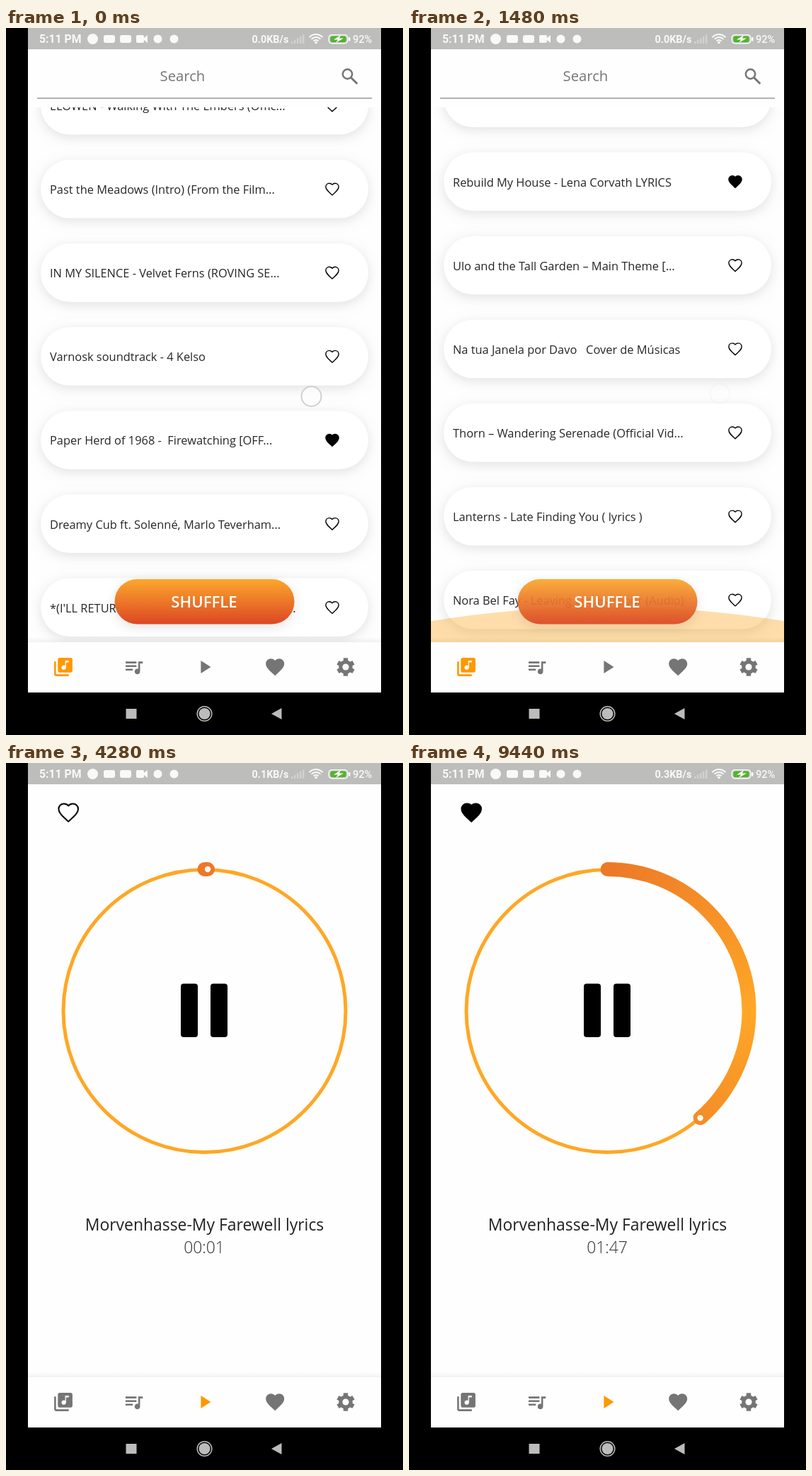
Write an HTML page with a canvas that moves like this. It is 561x998 px and loops after 9480 ms.

```html
<!DOCTYPE html>
<html lang="en">
<head>
<meta charset="utf-8">
<title>Music player</title>
<style>
  html, body { margin: 0; width: 100%; height: 100%; overflow: hidden; background: #000; }
  canvas { display: block; }
</style>
</head>
<body>
<canvas id="stage" width="561" height="998"></canvas>
<script>
const ctx = document.getElementById('stage').getContext('2d');
const LOOP = 9480, STEP = 40, PLAYER_AT = 4280, LIKE_AT = 8360;
const TAU = Math.PI * 2;
const PAPER = '#fdfefd', GREY = '#757575', ORANGE = '#ff9800', AMBER = '#ffa726', RUST = '#ec7828';
const TITLE = 'Morvenhasse-My Farewell lyrics';
const DURATION = 277;

const songs = [
  'ELOWEN - Walking With The Embers (Offic...',
  'Past the Meadows (Intro) (From the Film...',
  'IN MY SILENCE - Velvet Ferns (ROVING SE...',
  'Varnosk soundtrack - 4 Kelso',
  'Paper Herd of 1968 -  Firewatching [OFF...',
  'Dreamy Cub ft. Solenné, Marlo Teverham...',
  "*(I'LL RETURN TO THE OLD HARBOUR SHOR...",
  'Tessaly Grove - Paper Lanterns (Lyrics)',
  'Marrow Pine - Slow Tide [LIVE]',
  'u-ne - Walk To Me (Official 4K Music Vi...',
  'Dario Vance - Since I Left Your Town (Offic...',
  'Tale of the Marsh',
  'Ona - Raincoat',
  'Ona - Carry Us West',
  'Unlit Sky - Ironmoth [OFFICIAL VIDEO]',
  TITLE,
  'Ferrow - Quiet Engines (Visualizer)',
  'Lunet Vale - Copper Rain [LYRICS]',
  "Four Floors at Barley's 2 Song - The Li...",
  'Perry Calden - Edge of the Rain (Audio)',
  'Gather It or Run (Theme from "Farthest...',
  'Rebuild My House - Lena Corvath LYRICS',
  'Ulo and the Tall Garden – Main Theme [...',
  'Na tua Janela por Davo   Cover de Músicas',
  'Thorn – Wandering Serenade (Official Vid...',
  'Lanterns - Late Finding You ( lyrics )',
  'Nora Bel Fay - Leaving Old Harbour (Audio)'
];
const liked = new Set([4, 18, 21]);

const HEART = new Path2D('M16.5 3c-1.74 0-3.41.81-4.5 2.09C10.91 3.81 9.24 3 7.5 3 4.42 3 2 5.42 2 8.5c0 3.78 3.4 6.86 8.55 11.54L12 21.35l1.45-1.32C18.6 15.36 22 12.28 22 8.5 22 5.42 19.58 3 16.5 3z');
const LIBRARY = new Path2D('M20 2H8c-1.1 0-2 .9-2 2v12c0 1.1.9 2 2 2h12c1.1 0 2-.9 2-2V4c0-1.1-.9-2-2-2zm-2 5h-3v5.5c0 1.38-1.12 2.5-2.5 2.5S10 13.88 10 12.5s1.12-2.5 2.5-2.5c.57 0 1.08.19 1.5.51V5h4v2zM4 6H2v14c0 1.1.9 2 2 2h14v-2H4V6z');
const QUEUE = new Path2D('M15 6H3v2h12V6zm0 4H3v2h12v-2zM3 16h8v-2H3v2zM17 6v8.18c-.31-.11-.65-.18-1-.18-1.66 0-3 1.34-3 3s1.34 3 3 3 3-1.34 3-3V8h3V6h-5z');
const PLAY = new Path2D('M8 5v14l11-7z');

const clamp = v => Math.max(0, Math.min(1, v));
const progress = (t, from, to) => clamp((t - from) / (to - from));
const mix = (a, b, u) => a + (b - a) * u;
const easeOut = u => 1 - (1 - u) ** 2;
const smooth = u => u * u * (3 - 2 * u);

function scrollAt(t) {
  if (t < 1240) return 1424 * easeOut(progress(t, 280, 1240));
  if (t < 2200) return mix(1424, 2372.5, progress(t, 1240, 1460));
  if (t < 2320) return mix(2372.5, 2122.5, progress(t, 2200, 2320));
  return mix(2122.5, 1300, easeOut(progress(t, 2320, 3360)));
}

function secondsAt(t) {
  if (t < 5520) return mix(1, 102, smooth(progress(t, 4760, 5520)));
  return 102 + [5760, 6320, 6960, 7960, 8960].filter(tick => tick <= t).length;
}

function text(str, x, y, font, color, align = 'left') {
  ctx.font = font;
  ctx.fillStyle = color;
  ctx.textAlign = align;
  ctx.fillText(str, x, y);
}

function box(x, y, w, h, r, color) {
  ctx.beginPath();
  ctx.roundRect(x, y, w, h, r);
  ctx.fillStyle = color;
  ctx.fill();
}

function disc(x, y, r, color) {
  ctx.beginPath();
  ctx.arc(x, y, r, 0, TAU);
  ctx.fillStyle = color;
  ctx.fill();
}

function arc(x, y, r, from, to, width, color) {
  ctx.beginPath();
  ctx.arc(x, y, r, from, to);
  ctx.lineWidth = width;
  ctx.strokeStyle = color;
  ctx.stroke();
}

function polygon(points, color) {
  ctx.beginPath();
  points.forEach(([x, y]) => ctx.lineTo(x, y));
  ctx.fillStyle = color;
  ctx.fill();
}

function shadow(color, blur, dy) {
  ctx.shadowColor = color;
  ctx.shadowBlur = blur;
  ctx.shadowOffsetY = dy;
}

// Icons live on a 24-unit grid centred on (x, y).
function icon(path, x, y, scale, color, strokeWidth = 0, filled = true) {
  ctx.save();
  ctx.translate(x, y);
  ctx.scale(scale, scale);
  ctx.translate(-12, -12);
  ctx.fillStyle = ctx.strokeStyle = color;
  if (strokeWidth) {
    ctx.lineWidth = strokeWidth / scale;
    ctx.stroke(path);
  }
  if (filled) ctx.fill(path);
  ctx.restore();
}

function gear(x, y) {
  ctx.strokeStyle = GREY;
  ctx.lineWidth = 6.4;
  for (let i = 0; i < 3; i++) {
    const a = Math.PI / 2 + i * Math.PI / 3, dx = Math.cos(a) * 12.7, dy = Math.sin(a) * 12.7;
    ctx.beginPath();
    ctx.moveTo(x - dx, y - dy);
    ctx.lineTo(x + dx, y + dy);
    ctx.stroke();
  }
  disc(x, y, 9.8, GREY);
  disc(x, y, 4.6, '#fff');
}

function statusBar(t) {
  const ink = '#f9f9f9', bar = '#bdbdbc';
  box(31, 0, 499, 30, 0, bar);
  text('5:11 PM', 47, 21, '600 15.8px Roboto, sans-serif', ink);
  disc(122.5, 15.5, 7.5, ink);
  box(138, 10, 16, 11, 3, ink);
  box(161, 10, 16, 11, 3, ink);
  box(184, 10, 11, 11, 2, ink);
  polygon([[195, 14], [200, 10], [200, 21], [195, 17]], ink);
  disc(214.5, 15.5, 6, ink);
  disc(237.5, 15.5, 6, ink);

  const rate = t < PLAYER_AT ? '0.0' : t < 8320 ? '0.1' : '0.3';
  text(rate + 'KB/s', 347.5, 21, '600 14.4px Roboto, sans-serif', ink);
  for (let i = 0; i < 5; i++) box(403 + i * 4, 19 - i * 2.4, 2.4, 3 + i * 2.4, 0, '#d2d2d2');
  for (const r of [4.5, 8.5, 12.5]) arc(438, 21.5, r, -Math.PI * .77, -Math.PI * .23, 2, ink);
  disc(438, 20.5, 1.8, ink);
  box(455.5, 9, 28, 13.5, 5, ink);
  box(457, 10.5, 25, 10.5, 4, bar);
  box(458.5, 11.5, 22, 8.5, 3, '#52b52c');
  box(484, 13, 2.5, 5.5, 1, ink);
  polygon([[473, 10], [463, 16.5], [469, 16.5], [466, 21], [477, 14.5], [471, 14.5]], '#fff');
  text('92%', 490, 21, '500 14.6px Roboto, sans-serif', ink);
}

function bottomBars(onPlayer) {
  const fade = ctx.createLinearGradient(0, 860, 0, 867);
  fade.addColorStop(0, 'rgba(0,0,0,0)');
  fade.addColorStop(1, 'rgba(0,0,0,.05)');
  box(31, 860, 499, 7, 0, fade);
  box(31, 867, 499, 71, 0, '#fefefe');
  icon(LIBRARY, 81, 902, 1.29, onPlayer ? GREY : ORANGE);
  icon(QUEUE, 180.5, 902, 1.28, GREY);
  icon(PLAY, 280.5, 902, 1.28, onPlayer ? ORANGE : GREY);
  icon(HEART, 380.2, 902, 1.3, GREY);
  gear(480, 902);

  const ink = '#bcbcbc';
  box(0, 938, 561, 60, 0, '#000');
  box(169.5, 961, 15, 14, 0, ink);
  disc(280.5, 968, 8, ink);
  arc(280.5, 968, 10.3, 0, TAU, 1.5, ink);
  polygon([[375, 968], [389.5, 960], [389.5, 976]], ink);
}

function songRow(i, y) {
  ctx.save();
  shadow('rgba(0,0,0,.11)', 16, 4);
  box(49, y - 42, 463, 82.5, 41, '#fefffe');
  ctx.restore();
  text(songs[i], 62, y + 6, '16.4px "Open Sans", sans-serif', '#262626');
  icon(HEART, 461, y - .7, .91, '#000', 1.4, liked.has(i));
}

function listPage(t) {
  const scroll = scrollAt(t);
  const glow = t < 1480 ? progress(t, 1440, 1480) : 1 - progress(t, 1480, 1900);
  ctx.save();
  ctx.beginPath();
  ctx.rect(31, 112, 499, 755);
  ctx.clip();
  songs.forEach((_, i) => {
    const y = 110 + i * 118.1 - scroll;
    if (y > 40 && y < 930) songRow(i, y);
  });
  if (glow) disc(280.5, 866 - 49 * glow + 1550, 1550, `rgba(255,152,0,${.33 * glow})`);
  ctx.restore();

  text('Search', 217.5, 74.7, '20.3px "Open Sans", sans-serif', GREY);
  arc(482.5, 65, 6.7, 0, TAU, 2.5, GREY);
  ctx.beginPath();
  ctx.moveTo(487.5, 70);
  ctx.lineTo(496.3, 78.8);
  ctx.lineWidth = 3;
  ctx.stroke();
  box(44, 98.4, 473, 1.3, 0, '#858585');

  ctx.save();
  ctx.globalAlpha = 1 - .08 * glow;
  const fill = ctx.createLinearGradient(0, 778, 0, 841);
  fill.addColorStop(0, '#fca72c');
  fill.addColorStop(1, '#dc4824');
  shadow('rgba(0,0,0,.11)', 16, 4);
  box(153.5, 778, 254, 63.5, 31.7, fill);
  ctx.restore();
  text('SHUFFLE', 280, 818, '600 22.2px "Open Sans", sans-serif', '#fff', 'center');
}

function playerPage(t) {
  const cx = 280.5, cy = 350, top = -Math.PI / 2;
  const seconds = secondsAt(t), end = top + seconds / DURATION * TAU;
  icon(HEART, 88.2, 69.8, 1.38, '#000', 2, t >= LIKE_AT);

  arc(cx, cy, 199.5, 0, TAU, 5, AMBER);
  const sweep = ctx.createConicGradient(top, cx, cy);
  [RUST, AMBER, RUST, AMBER, RUST].forEach((color, i) => sweep.addColorStop(i / 4, color));
  ctx.lineCap = 'round';
  arc(cx, cy, 200, top, end, 20, sweep);
  ctx.lineCap = 'butt';
  disc(cx + 200 * Math.cos(end), cy + 200 * Math.sin(end), 4.2, '#fff');

  box(247, 311.5, 24, 75.5, 4, '#000');
  box(289, 311.5, 24, 75.5, 4, '#000');

  const pad = n => String(Math.floor(n)).padStart(2, '0');
  text(TITLE, cx, 660, '22.9px "Open Sans", sans-serif', '#212121', 'center');
  text(pad(seconds / 60) + ':' + pad(seconds % 60), 280, 692, '300 22.9px "Open Sans", sans-serif', '#333', 'center');
}

function finger(x, y, alpha) {
  if (alpha <= 0) return;
  ctx.save();
  ctx.globalAlpha = alpha;
  disc(x, y, 14, 'rgba(252,252,252,.8)');
  arc(x, y, 14, 0, TAU, 2, '#d0d0d0');
  ctx.restore();
}

function swipe(t, start, end, x0, y0, x1, y1, fade) {
  if (t < start) return;
  const u = progress(t, start, end);
  finger(mix(x0, x1, u), mix(y0, y1, u), 1 - progress(t, end, end + fade));
}

function touches(t) {
  if (t < 280) finger(431.5, 520, 1);
  swipe(t, 280, 440, 431.5, 520, 440, 250, 100);
  swipe(t, 1240, 1400, 430, 760, 439, 516, 90);
  swipe(t, 2200, 2320, 440, 487, 428, 737, 100);
  if (t >= 4760 && t < 5960) {
    const a = mix(0, 2.3, smooth(progress(t, 4760, 5520)));
    finger(280.5 + 207 * Math.sin(a), 350 - 207 * Math.cos(a), 1 - progress(t, 5760, 5960));
  }
}

function draw(now) {
  const t = Math.floor(now % LOOP / STEP) * STEP;
  const onPlayer = t >= PLAYER_AT;
  box(0, 0, 561, 998, 0, '#000');
  box(31, 30, 499, 908, 0, PAPER);
  (onPlayer ? playerPage : listPage)(t);
  bottomBars(onPlayer);
  statusBar(t);
  touches(t);
  requestAnimationFrame(() => draw(performance.now() - began));
}

const began = performance.now();
draw(0);
</script>
</body>
</html>
```
